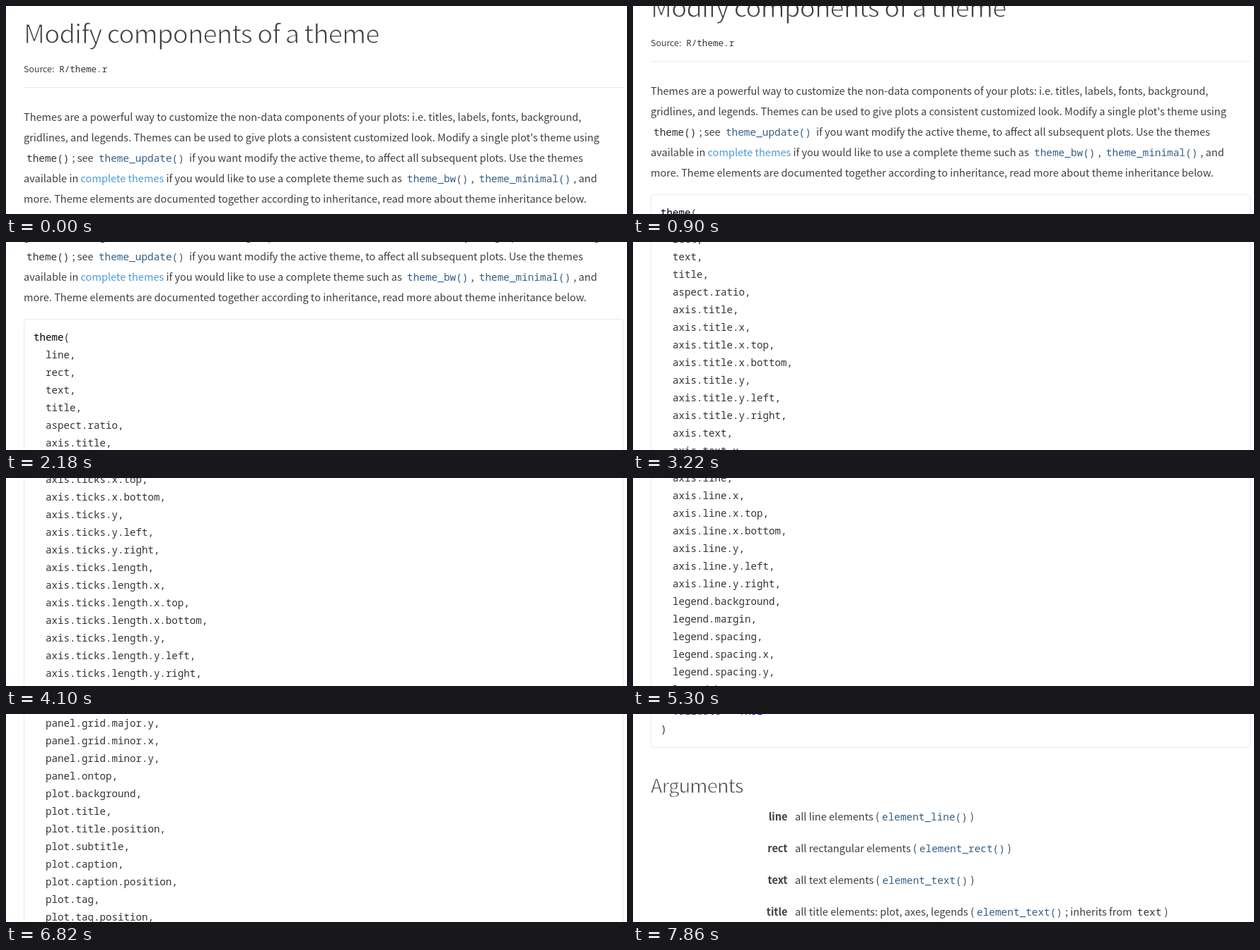
These frames come from a looping animation (878x295 px, 8 s). An HTML page:

```html
<!DOCTYPE html>
<html lang="en">
<head>
<meta charset="utf-8">
<title>Theme reference scroll</title>
<style>
  html, body { margin: 0; width: 100%; height: 100%; overflow: hidden; background: #fff; }
  body { color: #404040; font: 14.55px "Noto Sans CJK SC", "Noto Sans CJK JP", "Open Sans", sans-serif; }
  #page { position: relative; }
  #page > * { position: absolute; left: 25px; margin: 0; white-space: pre; }
  /* A white outline thins the regular weight to a light one. */
  h1, h2 { font-weight: 400; letter-spacing: -.03em; -webkit-text-stroke: .03em #fff; }
  h1 { top: 10px; font-size: 37px; line-height: 54px; }
  h2 { top: 2789px; font-size: 27.2px; line-height: 40px; }
  code, pre { font-family: "Noto Sans Mono", "Liberation Mono", monospace; color: #333; }
  code { padding: 0 4px; font-size: 14.4px; line-height: 0; }
  code.ref { color: #375f84; }
  .source { top: 79px; font-size: 12.4px; line-height: 20px; }
  .source code { font-size: 12.6px; }
  .rule { top: 115px; width: 848px; height: 1px; background: #e9e9e9; }
  .intro { top: 142px; line-height: 29px; }
  .link { color: #4c9bd6; }
  pre { top: 304px; box-sizing: border-box; width: 848px; height: 2453px; padding: 12px 13px;
    border: 1px solid #e9e9e9; border-radius: 4px; font-size: 14.17px; line-height: 25px; }
  .fn { color: #000; }
  .arg { color: #264d66; }
  .val { color: #00f; }
  dl { top: 2831px; display: grid; grid-template-columns: 193.5px auto; column-gap: 10.5px; line-height: 45px; }
  dt { font-weight: 700; text-align: right; }
  dd { margin: 0; }
</style>
</head>
<body>
<div id="page">
<h1>Modify components of a theme</h1>
<div class="source">Source: <code>R/theme.r</code></div>
<div class="rule"></div>
<p class="intro">Themes are a powerful way to customize the non-data components of your plots: i.e. titles, labels, fonts, background,
gridlines, and legends. Themes can be used to give plots a consistent customized look. Modify a single plot's theme using
<code>theme()</code>; see <code class="ref">theme_update()</code> if you want modify the active theme, to affect all subsequent plots. Use the themes
available in <span class="link">complete themes</span> if you would like to use a complete theme such as <code class="ref">theme_bw()</code>, <code class="ref">theme_minimal()</code>, and
more. Theme elements are documented together according to inheritance, read more about theme inheritance below.</p>
<pre id="usage"></pre>
<h2>Arguments</h2>
<dl><dt>line</dt><dd>all line elements (<code class="ref">element_line()</code>)</dd><dt>rect</dt><dd>all rectangular elements (<code class="ref">element_rect()</code>)</dd><dt>text</dt><dd>all text elements (<code class="ref">element_text()</code>)</dd><dt>title</dt><dd>all title elements: plot, axes, legends (<code class="ref">element_text()</code>; inherits from <code>text</code>)</dd></dl>
</div>
<script>
const page = document.getElementById('page');

// Argument names: each family shares a prefix, '-' stands for the prefix alone.
const family = (base, tails) => tails.split(' ').map(tail => tail === '-' ? base : `${base}.${tail}`);
const sides = '- x x.top x.bottom y y.left y.right';
const options = [
  'line', 'rect', 'text', 'title', 'aspect.ratio',
  ...['title', 'text', 'ticks', 'ticks.length', 'line'].flatMap(part => family('axis.' + part, sides)),
  ...family('legend', 'background margin spacing spacing.x spacing.y key key.size key.height key.width text text.align ' +
    'title title.align position direction justification box box.just box.margin box.background box.spacing'),
  ...family('panel', 'background border spacing spacing.x spacing.y grid grid.major grid.minor ' +
    'grid.major.x grid.major.y grid.minor.x grid.minor.y ontop'),
  ...family('plot', 'background title title.position subtitle caption caption.position tag tag.position margin'),
  ...family('strip', 'background background.x background.y placement text text.x text.y switch.pad.grid switch.pad.wrap'),
  '...'
];
const flag = (name, value) => `  <span class="arg">${name}</span> = <span class="val">${value}</span>`;
document.getElementById('usage').innerHTML = [
  '<span class="fn">theme</span>(',
  ...options.map(name => `  ${name},`),
  flag('complete', 'FALSE') + ',',
  flag('validate', 'TRUE'),
  ')'
].join('\n');

// The wheel turns in beats of five ticks; a few beats come one tick early.
const tick = 80, beats = 20, early = [6, 14, 17, 19];
const beatTime = n => 580 + 5 * tick * n - tick * early.filter(k => k <= n).length;

// Scroll path as [beat, offset], linear in between
const path = [[-1, 0], [.5, 37], [4, 195], [6, 285], [9, 878], [11, 1122], [12, 1180], [14, 1490], [16, 2092], [19, 2709]];
function offsetAt(beat) {
  const i = Math.max(1, path.findIndex(([b]) => b >= beat));
  const [[b0, y0], [b1, y1]] = [path[i - 1], path[i]];
  return Math.round(y0 + (y1 - y0) * (beat - b0) / (b1 - b0));
}

// Each beat moves half way one tick ahead, then the rest.
function beatAt(time) {
  let beat = -1;
  for (let n = 0; n < beats; n++) {
    if (time >= beatTime(n) - tick) beat = n - .5;
    if (time >= beatTime(n)) beat = n;
  }
  return beat;
}

const start = performance.now();
function draw() {
  const time = Math.max(0, performance.now() - start) % 8000;
  page.style.transform = `translateY(${-offsetAt(beatAt(time))}px)`;
  requestAnimationFrame(draw);
}
draw();
</script>
</body>
</html>
```
